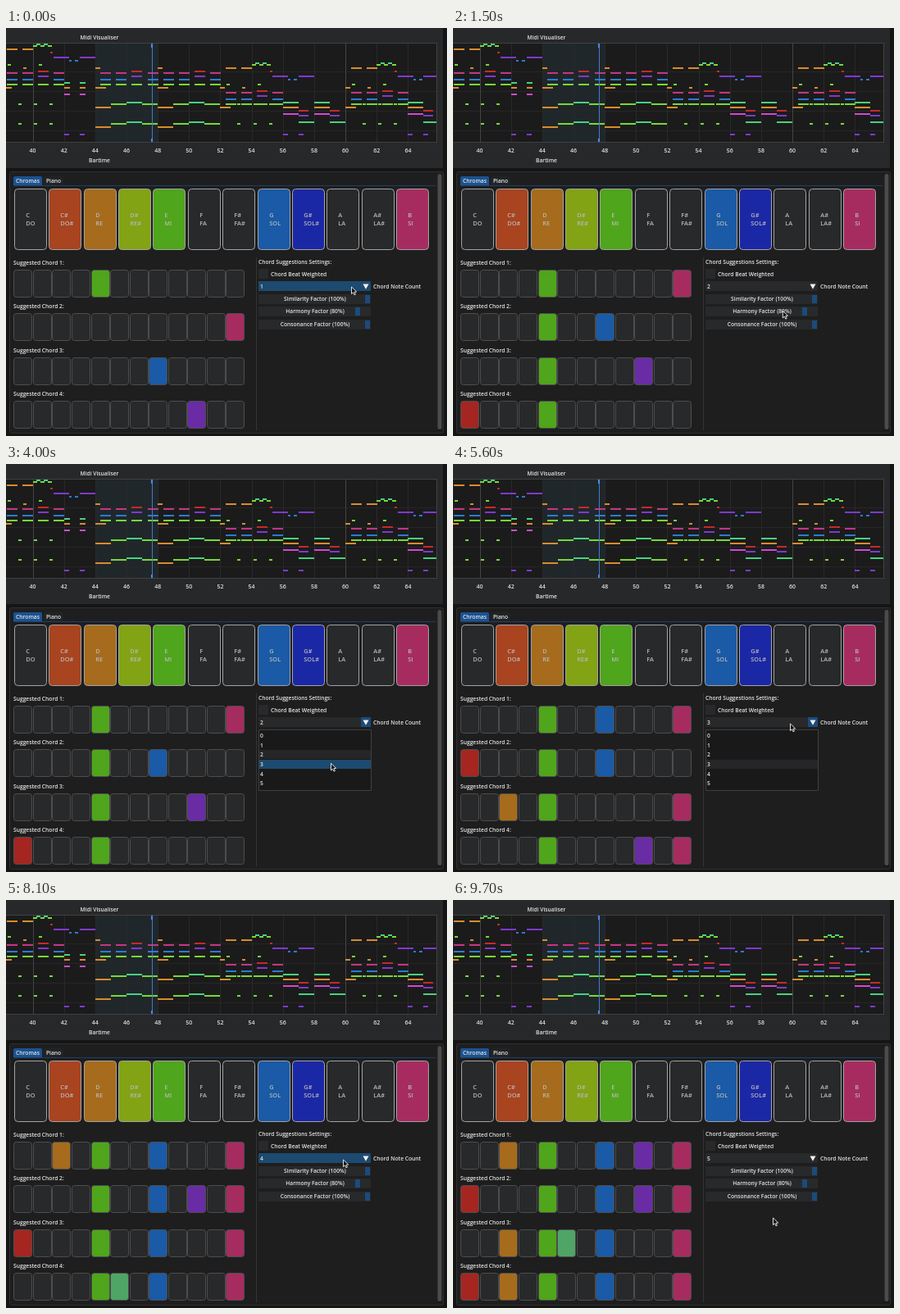
Write an HTML page with a canvas that moves like this. It is 538 px wide and 498 px high and loops after 10000 ms.

```html
<!DOCTYPE html>
<html lang="en">
<head>
<meta charset="utf-8">
<title>Midi Visualiser</title>
<style>
html, body { margin: 0; width: 100%; height: 100%; overflow: hidden; background: #151516; }
canvas { display: block; }
</style>
</head>
<body>
<canvas id="stage" width="538" height="498"></canvas>
<script>
const c = document.getElementById('stage').getContext('2d');
const LOOP = 10000, BAR = 19.08;
const EMPTY = '#28292b', FIELD = '#28292b', HOVER = '#1d4a70', BLUE = '#1b4b7c';
const KEYS = 'C C# D D# E F F# G G# A A# B'.split(' ');
const SOLFA = 'DO DO# RE RE# MI FA FA# SOL SOL# LA LA# SI'.split(' ');
const PLAYED = 'C# D D# E G G# B'.split(' ');
const HUE = {
  C: '#a52620', 'C#': '#a8441f', D: '#a66b1c', 'D#': '#82a314', E: '#4fa51b', F: '#4fa565',
  G: '#1a5aa6', 'G#': '#1b28a5', A: '#6a2ca5', B: '#a62c60'
};
const NOTE_HUE = {
  C: '#c42b27', D: '#d98c2c', E: '#77d936', F: '#48d27c',
  G: '#2c7ad2', A: '#8038d0', 'A#': '#cf49cc', B: '#c23782'
};

// four suggestions for each chord note count
const CHORDS = {
  1: 'E B G A',
  2: 'EB EG EA CE',
  3: 'EGB CEG DEB EAB',
  4: 'DEGB EGAB CEGB EFGB',
  5: 'DEGAB CEGAB DEFGB CDEGB'
};
// the list opens, then an entry is picked
const VISITS = [
  { open: 400, pick: 1200, count: 2 },
  { open: 3000, pick: 4100, count: 3 },
  { open: 5500, pick: 6500, count: 4 },
  { open: 8200, pick: 9000, count: 5 }
];
const HOME = [411, 317];

function rect(x, y, w, h, color) {
  c.fillStyle = color;
  c.fillRect(x, y, w, h);
}
function frame(x, y, w, h, r, fill, line) {
  c.beginPath();
  c.roundRect(x, y, w, h, r);
  if (fill) { c.fillStyle = fill; c.fill(); }
  if (line) { c.strokeStyle = line; c.lineWidth = 1; c.stroke(); }
}
function text(s, x, y, align = 'left', color = '#e4e4e4', size = 6.7) {
  c.font = `600 ${size}px "Open Sans", "Noto Sans", sans-serif`;
  c.textAlign = align;
  c.fillStyle = color;
  c.fillText(s, x, y + 2.5);
}

// piano roll: height and colour both follow from the pitch
const barX = bar => 32.5 + BAR * (bar - 40);
function note(pitch, bar, len) {
  const y = Math.round(219.5 - 1.978 * pitch) - 1;
  rect(Math.round(barX(bar)), y, Math.round(BAR * len), 2, NOTE_HUE[KEYS[pitch % 12]]);
}
function chord(pitches, shift, bar, len) {
  for (const p of pitches) note(p + shift, bar, len);
}
// four bars of E minor with A minor in the third
function vamp(bar, shift) {
  note(62 + shift, bar, .66);
  note(74 + shift, bar, .3);
  for (let i = 0; i < 4; i++)
    chord(i === 2 ? [64, 69, 72] : [64, 67, 71], shift, bar + i + .34, .66);
}
function melody(bar, shift, tail) {
  const tune = (pitch, at, len) => note(pitch + shift, bar + at, len);
  vamp(bar, shift);
  tune(86, .34, .66);
  tune(86, 1.34, .66);
  for (let i = 0; i < 5; i++) tune(88 + i % 2, 2 + i * .24, .24);
  tune(84, 3.15, .15);
  tune(81, 3.35, 1);
  tune(79, 4.35, .15);
  tune(79, 4.7, .2);
  tune(81, 5, 1);
  for (let i = 1; i < 4; i++) {
    note(64, bar + i + .1, .2);
    note(52, bar + i + .1, .2);
    tune(i % 2 ? 76 : 74, i - .6, .2);
  }
  for (let i = 4; i < 4 + tail; i++) {
    const flat = tail < 4 || i % 2 === 0;
    chord(flat ? [58, 62, 65] : [57, 60], shift, bar + i, tail < 4 ? .35 : flat ? 1 : .65);
    if (!flat) note(53, bar + i, 1);
    if (i < 6) note(45, bar + i, .3);
  }
}
// held bass line in octaves
function bass(bar) {
  [62, 64, 65, 64].forEach((p, i) => chord([p, p - 12], 0, bar + i, .97));
}

function plot() {
  rect(0, 0, 533, 171, '#27282a');
  text('Midi Visualiser', 114, 11, 'center');
  text('Bartime', 114, 161, 'center');
  rect(0, 18, 526, 122, '#1b1b1c');
  c.save();
  c.beginPath();
  c.rect(0, 18, 526, 122);
  c.clip();
  rect(109, 18, 76, 122, '#20272b');
  for (let y = 53; y < 140; y += 24) rect(0, y, 526, 1, '#262627');
  for (let b = 40; b < 66; b += 2)
    rect(Math.round(barX(b)), 18, 1, 122, b % 20 ? '#29292a' : '#434344');
  melody(38, 12, 2);
  for (const b of [44, 48]) {
    vamp(b, 12);
    bass(b);
  }
  melody(52, 0, 4);
  melody(60, 0, 4);
  rect(178, 18, 1, 122, '#467ac8');
  rect(177, 18, 2, 6, '#4d8be6');
  rect(177, 135, 2, 5, '#4d8be6');
  c.restore();
  c.strokeStyle = '#414142';
  c.lineWidth = 1;
  c.strokeRect(-1, 18.5, 526.5, 121);
  for (let b = 40; b < 66; b += 2) text(b, barX(b), 149, 'center', '#e0e0e0', 7);
}

function panel() {
  frame(4.5, 175.5, 529, 319, 2, '#1e1e1f', '#303031');
  rect(526, 178, 6, 314, '#18181a');
  frame(526.5, 178, 5, 312, 2.5, '#4b4b4c');
  frame(9, 181, 35, 11.5, [2, 2, 0, 0], '#1b5290');
  frame(46, 181, 24, 11, [2, 2, 0, 0], '#222325');
  rect(9, 192, 515, 1, '#1c3f66');
  text('Chromas', 26.5, 186.7, 'center');
  text('Piano', 58, 186.7, 'center');
  KEYS.forEach((key, i) => {
    const x = Math.round(42.37 * i) + 10.5;
    frame(x, 196.5, 39, 74, 4, PLAYED.includes(key) ? HUE[key] : EMPTY, '#a2a2a2');
    text(key, x + 13.8, 228.3, 'left', '#b8b8b8', 7.4);
    text(SOLFA[i], x + 13.8, 238.4, 'left', '#b8b8b8', 7.4);
  });
  rect(305, 280, 1, 211, '#343435');
}

function suggestions(count) {
  CHORDS[count].split(' ').forEach((notes, row) => {
    const y = Math.round(295 + row * 53.3) + .5;
    text(`Suggested Chord ${row + 1}:`, 9, y - 9);
    KEYS.forEach((key, i) => {
      const fill = notes.includes(key) ? HUE[key] : EMPTY;
      frame(Math.floor(9.8 + 23.56 * i) + .5, y, 22, 33, 3, fill, '#4d4d4e');
    });
  });
}

function slider(label, y, grab) {
  frame(308, y, 137, 12, 1, FIELD);
  rect(grab, y + 1, 6, 10, BLUE);
  text(label, 377, y + 5.8, 'center');
}

function settings(count, open, x, y) {
  const hover = !open && x > 308 && x < 445 && y > 309 && y < 322;
  text('Chord Suggestions Settings:', 308, 285);
  frame(308, 294, 12, 12, 1, FIELD);
  text('Chord Beat Weighted', 323, 300);
  frame(308, 309, 137, 12, 1, hover ? HOVER : FIELD);
  if (open) rect(433, 309, 12, 12, BLUE);
  text(count, 310, 315.5);
  c.fillStyle = '#f0f0f0';
  c.beginPath();
  c.moveTo(435.5, 312.5);
  c.lineTo(442.5, 312.5);
  c.lineTo(439, 318.8);
  c.fill();
  text('Chord Note Count', 448, 315.5);
  if (!open) {
    slider('Similarity Factor (100%)', 325, 438);
    slider('Harmony Factor (80%)', 340, 426);
    slider('Consonance Factor (100%)', 356, 438);
    return;
  }
  frame(308.5, 324.5, 137, 74, 0, '#19191a', '#3f3f40');
  const over = Math.floor((y - 326) / 11.65);
  for (let i = 0; i < 6; i++) {
    const top = Math.round(326 + i * 11.65);
    if (i === over) rect(309, top, 136, 11, HOVER);
    else if (i === count) rect(309, top, 136, 11, '#262628');
    text(i, 310, top + 5.6);
  }
}

function pointer(x, y) {
  c.beginPath();
  for (const [dx, dy] of [[0, 0], [0, 8.6], [2, 6.8], [3.5, 9.8], [4.9, 9.1], [3.5, 6.2], [6.2, 6]])
    c.lineTo(x + .5 + dx, y + dy);
  c.closePath();
  c.fillStyle = '#111';
  c.strokeStyle = '#f2f2f2';
  c.lineWidth = .9;
  c.fill();
  c.stroke();
}

function ease(t, from, to) {
  const u = Math.min(1, Math.max(0, (t - from) / (to - from)));
  return u * u * (3 - 2 * u);
}
function pointerAt(t) {
  const rest = 1 - ease(t, 0, 250);
  let x = HOME[0] + 10 * rest, y = HOME[1] - rest;
  for (const { open, pick, count } of VISITS) {
    const back = count < 5 ? ease(t, pick, pick + 950) : 0;
    const away = ease(t, open + 200, pick - 200) - back;
    x += (405 - 3 * count - HOME[0]) * away;
    y += (331.5 + 11.3 * count - HOME[1]) * away;
  }
  return [x, y];
}

function draw(now) {
  const t = Math.floor((now % LOOP) / 100) * 100;
  const count = VISITS.reduce((n, v) => t >= v.pick ? v.count : n, 1);
  const open = VISITS.some(v => t >= v.open && t < v.pick);
  const [x, y] = pointerAt(t);
  rect(0, 0, 538, 498, '#151516');
  plot();
  panel();
  suggestions(count);
  settings(count, open, x, y);
  pointer(x, y);
  requestAnimationFrame(draw);
}
requestAnimationFrame(draw);
</script>
</body>
</html>
```
